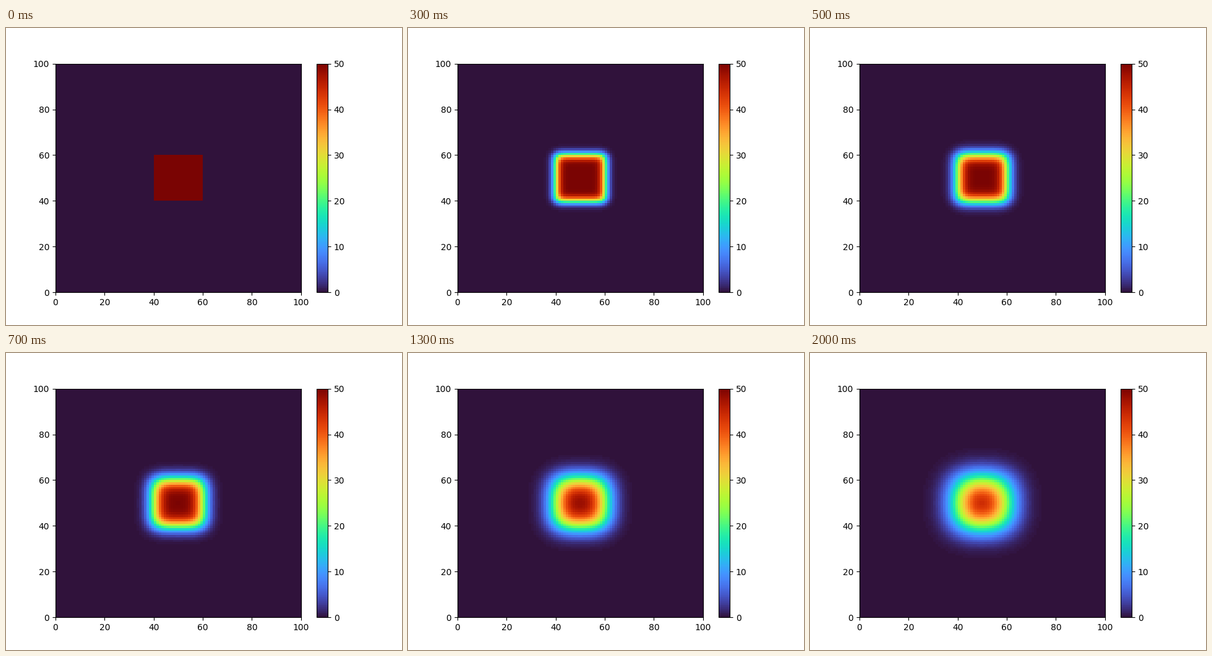
Animation, 640 px wide and 480 px high, one loop 2100 ms. Source, as a matplotlib script:

```python
import numpy as np
import matplotlib.pyplot as plt
from matplotlib.animation import FuncAnimation

SIZE = 100        # cells per side
HOT = 50          # temperature of the central block
FRAMES = 21
RATE = 0.05       # diffusion number of one explicit step
STEPS = 15        # steps between frames


def step(u):
    """One explicit step of the heat equation, with fixed borders."""
    new = u.copy()
    new[1:-1, 1:-1] += RATE * (
        u[2:, 1:-1] + u[:-2, 1:-1] + u[1:-1, 2:] + u[1:-1, :-2]
        - 4 * u[1:-1, 1:-1]
    )
    return new


def simulate():
    u = np.zeros((SIZE, SIZE))
    u[40:60, 40:60] = HOT
    fields = [u]
    for k in range(1, FRAMES):
        for _ in range(1 if k == 1 else STEPS):
            u = step(u)
        fields.append(u)
    return fields


fields = simulate()

fig, ax = plt.subplots(figsize=(6.4, 4.8), dpi=100)
mesh = ax.pcolormesh(fields[0], cmap="turbo", vmin=0, vmax=HOT)
fig.colorbar(mesh, ax=ax)


def update(k):
    mesh.set_array(fields[k])
    return (mesh,)


anim = FuncAnimation(fig, update, frames=FRAMES, interval=100, repeat=True,
                     repeat_delay=0)
plt.show()
```
